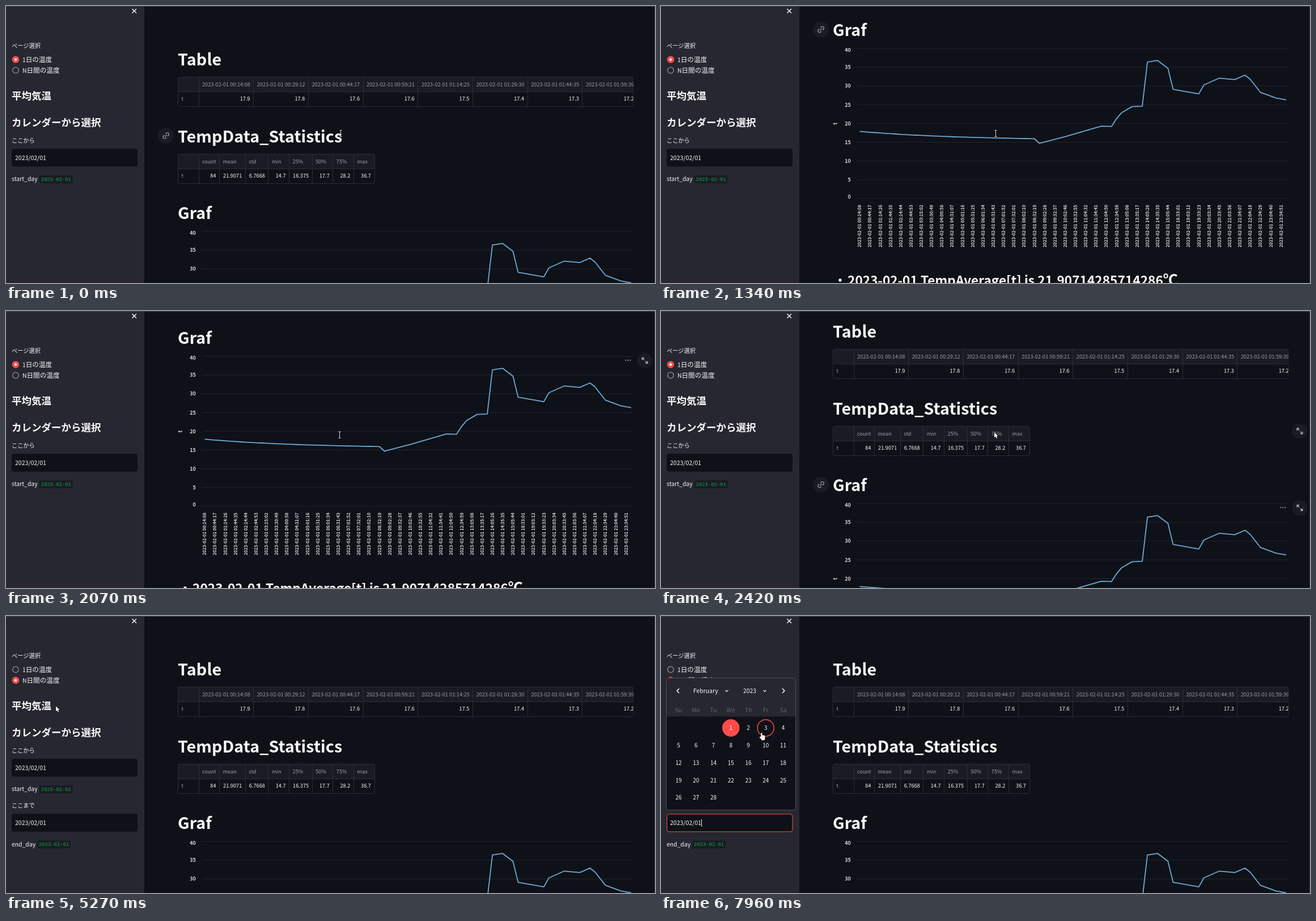
These frames come from a looping animation (1145x489 px, 8000 ms). An HTML page with a canvas:

```html
<!DOCTYPE html>
<html lang="ja">
<head>
<meta charset="utf-8">
<title>Temperature dashboard</title>
<style>
html, body { margin: 0; width: 100%; height: 100%; overflow: hidden; background: #0e1117; }
canvas { display: block; width: 1145px; height: 489px; }
</style>
</head>
<body>
<canvas id="stage"></canvas>
<script>
const W = 1145, H = 489, LOOP = 8000;
const SANS = '"Noto Sans CJK JP", "Noto Sans JP", "Noto Sans", sans-serif';
const MONO = '"Liberation Mono", "Noto Sans Mono", monospace';
const BG = '#0e1117', PANEL = '#262730', RAISED = '#1a1c24', EDGE = '#2b2d35';
const INK = '#fafafa', MUTED = '#9c9ea5', AXIS = '#d9dadd', RED = '#ff4b4b', GREEN = '#09ab3b';

const canvas = document.getElementById('stage');
const ctx = canvas.getContext('2d');
const dpr = window.devicePixelRatio || 1;
canvas.width = W * dpr;
canvas.height = H * dpr;

// moves: [start, end, ...destination]
const scrolls = [[690, 1010, 142], [1150, 1700, 457], [1950, 2680, 0]];
const glides = [
  [1950, 2300, 588, 214], [2800, 3750, 91, 116], [4700, 5270, 88, 158], [5270, 5450, 87, 242],
  [5510, 5640, 96, 260], [5840, 5970, 96, 266], [6220, 6690, 128, 368], [7050, 7950, 177, 206]
];

const easeOut = k => 1 - (1 - k) ** 2;

function follow(moves, origin, t) {
  let pos = origin;
  for (const [start, end, ...to] of moves) {
    if (t < start) break;
    const k = easeOut(Math.min(1, (t - start) / (end - start)));
    pos = pos.map((v, i) => v + (to[i] - v) * k);
  }
  return pos;
}

const within = (t, a, b) => t >= a && t < b;

function text(s, x, y, size, color = INK, weight = 400, align = 'left', family = SANS) {
  ctx.font = `${weight} ${size}px ${family}`;
  ctx.textAlign = align;
  ctx.fillStyle = color;
  ctx.fillText(s, x, y);
  return ctx.measureText(s).width;
}

function box(x, y, w, h, r, fill, stroke) {
  ctx.beginPath();
  ctx.roundRect(x, y, w, h, r);
  if (fill) { ctx.fillStyle = fill; ctx.fill(); }
  if (stroke) { ctx.strokeStyle = stroke; ctx.lineWidth = 1; ctx.stroke(); }
}

function dot(x, y, r, fill) {
  ctx.beginPath();
  ctx.arc(x, y, r, 0, 7);
  ctx.fillStyle = fill;
  ctx.fill();
}

function ring(x, y, r, color, width) {
  ctx.beginPath();
  ctx.arc(x, y, r, 0, 7);
  ctx.strokeStyle = color;
  ctx.lineWidth = width;
  ctx.stroke();
}

function path(points, color, width) {
  ctx.beginPath();
  points.forEach(([x, y]) => ctx.lineTo(x, y));
  ctx.strokeStyle = color;
  ctx.lineWidth = width;
  ctx.lineJoin = 'round';
  ctx.stroke();
}

// ---- main page ----

const words = s => s.split(' ');
const dayHeads = words('00:14:08 00:29:12 00:44:17 00:59:21 01:14:25 01:29:30 01:44:35 01:59:39')
  .map(s => '2023-02-01 ' + s);
const dayCells = words('17.9 17.8 17.6 17.6 17.5 17.4 17.3 17.2');
const statHeads = words('count mean std min 25% 50% 75% max');
const statCells = words('84 21.9071 6.7668 14.7 16.375 17.7 28.2 36.7');

// columns fit their values unless a width is given
function table(y, right, heads, cells, colWidth) {
  const w = right - 303.5;
  ctx.save();
  ctx.beginPath();
  ctx.rect(303, y, w + 1, 54);
  ctx.clip();
  box(303.5, y + .5, w, 52, 3, BG);
  box(303.5, y + .5, w, 26, [3, 3, 0, 0], RAISED);
  path([[303, y + 26.5], [right, y + 26.5]], EDGE, 1);
  text('t', 309.5, y + 42, 9.2, MUTED);
  let x = 340;
  heads.forEach((head, i) => {
    const line = Math.floor(x) + .5;
    path([[line, y], [line, y + 53]], EDGE, 1);
    text(head, x + 6, y + 16.5, 9.2, MUTED);
    x += colWidth || Math.max(36.6, ctx.measureText(cells[i]).width + 12.6);
    text(cells[i], x - 6.1, y + 42, 9.2, INK, 400, 'right');
  });
  box(303.5, y + .5, w, 52, 3, null, EDGE);
  ctx.restore();
}

// a slow cooling curve, then the turning points of the day
const night = Array.from({ length: 35 }, (_, i) => [i, 15.5 + 2.4 * Math.exp(-i / 20)]);
const turns = [
  [35, 14.7], [40, 16.5], [47, 19.3], [49, 19.2], [50, 21.3], [51, 22.9], [53, 24.5], [55, 24.6],
  [56, 36.4], [58, 36.8], [60, 34.7], [61, 29.1], [66, 27.9], [67, 30.3], [70, 32.1], [73, 31.7],
  [75, 32.9], [76, 31.8], [78, 28.3], [81, 26.8], [83, 26.3]
];
const plotX = i => 350.5 + 9.065 * i;
const plotY = v => 398 + (40 - v) * 6.62;

// a tick every 30:09, shifted where readings are missing
function clock(k) {
  let s = 848 + 1809 * k;
  if (k >= 7) s -= 862;
  if (k >= 22) s += 88;
  if (k >= 31) s += 10628 + 2 * (k - 31);
  return [s / 3600, s / 60 % 60, s % 60].map(n => String(Math.floor(n)).padStart(2, '0')).join(':');
}

function upright(s, x, y, size, align) {
  ctx.save();
  ctx.translate(x, y);
  ctx.rotate(-Math.PI / 2);
  text(s, 0, 0, size, AXIS, 700, align);
  ctx.restore();
}

function chart() {
  for (let v = 0; v <= 40; v += 5) {
    const y = plotY(v), flush = v === 40 ? 2.3 : v === 0 ? -3.5 : 0;
    path([[346, y], [1107, y]], '#22252d', 1);
    text(v, 334.8, y + 3.2 + flush, 9, AXIS, 700, 'right');
  }
  upright('t', 310.5, 530.5, 9, 'center');
  path([...night, ...turns].map(([i, v]) => [plotX(i), plotY(v)]), '#6caad9', 1.8);
  for (let k = 0; k < 42; k++) upright('2023-02-01 ' + clock(k), plotX(2 * k) + 2.8, 674, 7.6, 'right');
}

function linkButton(y) {
  dot(282, y, 14, RAISED);
  ctx.save();
  ctx.translate(282.2, y);
  ctx.rotate(-Math.PI / 4);
  for (const side of [0, Math.PI]) {
    ctx.save();
    ctx.rotate(side);
    ctx.beginPath();
    ctx.moveTo(1.4, -2.8);
    ctx.arc(3.4, 0, 2.8, -Math.PI / 2, Math.PI / 2);
    ctx.lineTo(1.4, 2.8);
    ctx.strokeStyle = '#a6a8ae';
    ctx.lineWidth = 1.3;
    ctx.stroke();
    ctx.restore();
  }
  path([[-2.6, 0], [2.6, 0]], '#a6a8ae', 1.3);
  ctx.restore();
}

function expandButton(y) {
  const x = 1127, color = '#bfc0c5';
  dot(x, y, 13.5, RAISED);
  for (const s of [-1, 1]) {
    path([[x + s, y + s], [x + s * 4.5, y + s * 4.5]], color, 1.3);
    path([[x + s * 4.8, y + s], [x + s * 4.8, y + s * 4.8], [x + s, y + s * 4.8]], color, 1.3);
  }
}

function page(t) {
  ctx.save();
  ctx.beginPath();
  ctx.rect(244, 23, W - 244, H - 23);
  ctx.clip();
  ctx.translate(0, -Math.round(follow(scrolls, [0], t)[0]));

  text('Table', 303, 105, 28.8, INK, 700);
  table(125, 1107, dayHeads, dayCells, 96.7);
  text('TempData_Statistics', 303, 240.5, 28.8, INK, 700);
  table(261, 650.5, statHeads, statCells);
  text('Graf', 303, 376, 28.8, INK, 700);
  chart();
  dot(316, 807, 2.7, INK);
  const w = text('2023-02-01 TempAverage[t] is 21.90714285714286', 329, 815.5, 22.7, INK, 700);
  text('℃', 329 + w, 815.5, 26.1, INK, 700);

  if (t < 1010 || within(t, 2560, 2860)) linkButton(229);
  if (within(t, 1010, 1400) || within(t, 2300, 2500)) linkButton(364.5);
  if (within(t, 2380, 2800)) expandButton(270);
  if (within(t, 2000, 2500)) {
    expandButton(405.5);
    for (const dx of [-4, 0, 4]) dot(1097.3 + dx, 405, 1.2, '#777a82');
  }
  ctx.restore();
}

// ---- sidebar ----

function radio(y, on, hover, latin, label) {
  if (on) {
    dot(17, y, 6.2, RED);
    dot(17, y, 2.3, '#fff');
  } else {
    if (hover) dot(17, y, 5.4, BG);
    ring(17, y, 5.3, '#84858b', 1.5);
  }
  const w = text(latin, 29, y + 4.1, 10.4);
  text(label, 29 + w, y + 4.1, 11.6);
}

function dateField(y, label, name, focus) {
  text(label, 10, y - 11.2, 10.2);
  box(10, y, 222, 31.5, 4, BG);
  if (focus) box(10.5, y + .5, 221.5, 31, 4, null, RED);
  text('2023/02/01', 16, y + 20, 10.5);
  const x = 13 + text(name, 10, y + 57.3, 10.4);
  box(x, y + 47, 59, 14, 3, RAISED);
  text('2023-02-01', x + 3, y + 57, 8.85, GREEN, 400, 'left', MONO);
}

const CELL = 30.75;
const cellX = col => 31 + CELL * col;
const cellY = row => 197.6 + CELL * row;

function dayUnder(x, y) {
  const col = Math.round((x - cellX(0)) / CELL), row = Math.round((y - cellY(0)) / CELL);
  const day = row * 7 + col - 2;
  return within(col, 0, 7) && row >= 0 && within(day, 1, 29) ? day : 0;
}

function calendar(hovered) {
  box(9.5, 109.5, 228, 233, 5, BG);
  box(9.5, 109.5, 228, 68, [5, 5, 0, 0], PANEL);
  box(9.5, 109.5, 228, 233, 5, null, '#4d4f57');
  text('February', 57, 135.9, 10.4, INK, 500);
  text('2023', 145, 135.9, 10.4, INK, 500);
  for (const x of [116, 183]) path([[x - 2.5, 130.8], [x, 133.3], [x + 2.5, 130.8]], INK, 1.2);
  for (const [x, d] of [[30, -2], [216, 2]]) path([[x - d, 128], [x + d, 132], [x - d, 136]], INK, 1.6);
  words('Su Mo Tu We Th Fr Sa').forEach((s, i) => text(s, cellX(i), 169.6, 10.4, '#64666f', 400, 'center'));
  for (let day = 1; day <= 28; day++) {
    const x = cellX((day + 2) % 7), y = cellY(Math.floor((day + 2) / 7));
    if (day === 1) dot(x, y, 15.3, RED);
    else if (day === hovered) ring(x, y, 14.6, RED, 1.4);
    text(day, x, y + 3.7, 10, INK, 400, 'center');
  }
}

function sidebar(t, x, y) {
  const range = t >= 4550, open = t >= 6950;
  ctx.fillStyle = PANEL;
  ctx.fillRect(0, 0, 244, H);
  path([[222.5, 5], [230, 12.5]], INK, 1.4);
  path([[230, 5], [222.5, 12.5]], INK, 1.4);

  text('ページ選択', 10, 73.6, 10.2);
  radio(94.5, !range, false, '1', '日の温度');
  radio(113.5, range, within(t, 3690, 4800), 'N', '日間の温度');
  text('平均気温', 10, 164.7, 17.5, INK, 700);
  text('カレンダーから選択', 10, 211.7, 17.5, INK, 700);
  dateField(252, 'ここから', 'start_day', false);
  if (t >= 4950) dateField(349.3, 'ここまで', 'end_day', open);
  if (open) {
    calendar(dayUnder(x, y));
    if ((t - 6950) % 1000 < 500) path([[71.5, 359], [71.5, 372]], INK, 1);
  }
}

// ---- pointer ----

function cursor(shape, x, y) {
  ctx.save();
  ctx.translate(x, y);
  ctx.beginPath();
  shape();
  ctx.strokeStyle = '#000';
  ctx.lineWidth = 1.4;
  ctx.lineJoin = 'round';
  ctx.stroke();
  ctx.fillStyle = '#fff';
  ctx.fill();
  ctx.restore();
}

function arrow() {
  [[0, 0], [0, 9.6], [2.2, 7.6], [3.8, 11], [5.3, 10.3], [3.8, 7.1], [6.8, 7]]
    .forEach(([x, y]) => ctx.lineTo(x, y));
  ctx.closePath();
}

function hand() {
  ctx.roundRect(-.7, 0, 2.2, 9, 1);
  ctx.roundRect(-.7, 4.4, 7.2, 9.2, [1, 2.5, 3, 3]);
  ctx.roundRect(-3, 6.8, 4, 3.4, 1.5);
}

function ibeam(x, y) {
  const color = '#d9d9db';
  path([[x, y - 5.5], [x, y + 5.5]], color, 1);
  for (const s of [-5.5, 5.5]) path([[x - 2, y + s], [x + 2, y + s]], color, 1);
}

function pointer(t, x, y) {
  const onInput = x < 232 && (within(y, 252, 283) && t < 6950 || within(y, 349, 381));
  const onRadio = x < 97 && within(y, 88, 120);
  const onDay = t >= 6950 && dayUnder(x, y);
  if (t < 2100 || onInput) ibeam(Math.floor(x) + .5, y);
  else cursor(onRadio || onDay ? hand : arrow, x, y);
}

function draw(t) {
  const [x, y] = follow(glides, [590, 225], t);
  ctx.setTransform(dpr, 0, 0, dpr, 0, 0);
  ctx.fillStyle = BG;
  ctx.fillRect(0, 0, W, H);
  page(t);
  sidebar(t, x, y);
  ctx.fillStyle = '#45474d';
  ctx.fillRect(0, 0, W, 1);
  ctx.fillStyle = '#30333a';
  ctx.fillRect(W - 1, 0, 1, H);
  pointer(t, x, y);
}

const start = performance.now();
function tick() {
  draw((performance.now() - start) % LOOP);
  requestAnimationFrame(tick);
}
tick();
</script>
</body>
</html>
```
